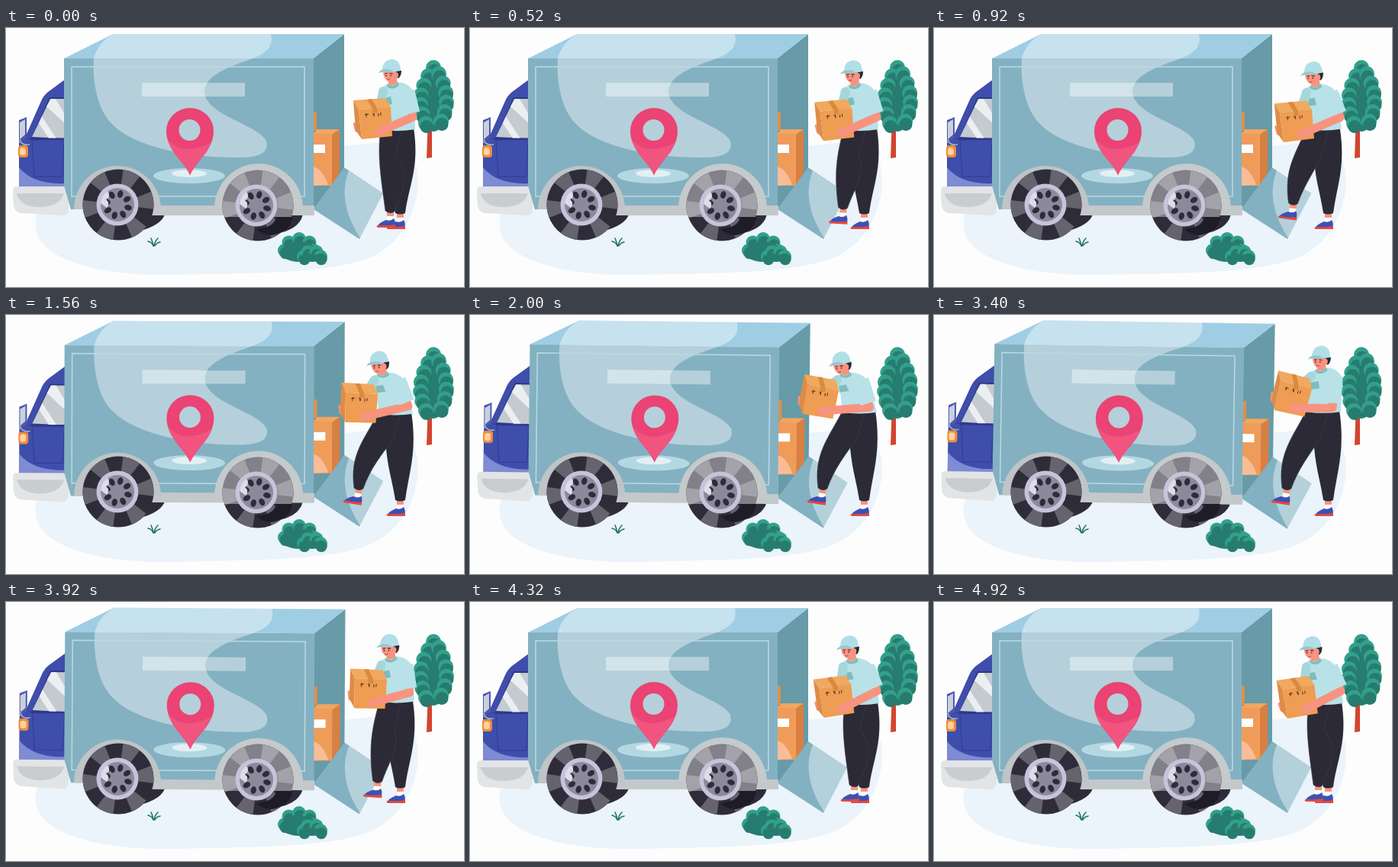
Recreate the animation shown at these times as an HTML page. Size 600 by 340 pixels, loop 4960 ms.

```html
<!DOCTYPE html>
<html lang="en">
<head>
<meta charset="utf-8">
<title>Loading a delivery truck</title>
<style>
html, body { margin: 0; width: 100%; height: 100%; overflow: hidden; background: #fdfdfd; }
svg { display: block; width: 100vw; height: 100vh; }
.skin { fill: #f7937f; }
.arm { fill: none; stroke: #f7937f; stroke-width: 11; stroke-linejoin: round; stroke-linecap: round; }
.pants { fill: #2c2a37; }
.gloss { fill: #fff; fill-opacity: .4; }
.leaf { fill: #32a08b; }
.shade { fill: #277c6f; }
</style>
</head>
<body>
<svg viewBox="0 0 600 340">
  <defs>
    <g id="tyre">
      <circle r="46.5" fill="#2f2c3a"/>
      <circle r="36.5" fill="none" stroke="#65636e" stroke-width="20" stroke-dasharray="18.5 19.72" transform="rotate(-82)"/>
    </g>
    <g id="rim">
      <circle r="27.5" fill="#c5c4da"/>
      <circle r="22" fill="#8b899b"/>
      <g id="holes" fill="#2f2c3a"></g>
      <path d="M-22-2A22 22 0 0 1-13-18Q-8-10-15-7Q-9-2-14 4Z" fill="#dddde9"/>
    </g>
    <g id="shoe">
      <path class="skin" d="M-4-2H5V12H-4Z"/>
      <path fill="#fff" d="M-4 6H5V12H-4Z"/>
      <path fill="#3d50b4" d="M-5 11Q1 13 5 9Q8 14 6 19H-16Q-15 15-5 11Z"/>
      <path fill="#e4483f" d="M-17 18Q-8 19 7 17V21H-16Q-18 20-17 18Z"/>
    </g>
  </defs>

  <path fill="#eaf4fa" d="M39 262C42 300 110 324 205 324C330 322 430 322 480 300C530 275 540 225 540 200C540 165 520 148 480 151L200 180C80 190 36 220 39 262Z"/>
  <path fill="#d1452f" d="M551 171L553 115H558L558 170Z"/>
  <g id="tree"></g>
  <path fill="#2f2c3a" d="M165 245H208Q203 258 180 265ZM350 245H389Q384 264 358 269Z"/>

  <g id="truck">
    <path fill="#679ba7" d="M402 40L443 8V184L403 238Z"/>
    <path fill="#e08f4a" d="M402 110H407V135H402Z"/>
    <path fill="#f2a65e" d="M402 139L408 133H437L427 140Z"/>
    <path fill="#ef9c5a" d="M402 139H427V207H402Z"/>
    <path fill="#d97f42" d="M427 140L437 133V190L427 207Z"/>
    <path fill="#f8bd97" d="M402 182Q414 184 422 206L402 207Z"/>
    <path fill="#fff" d="M402 153H418V164H402Z"/>
    <path fill="#82b1c2" d="M403 238L443 183L494 217L463 277Z"/>
    <path class="gloss" fill-opacity=".33" d="M449 187Q433 228 464 276L494 217Z"/>

    <path fill="#3f4dab" d="M78 67L55 84Q49 89 46 96L27 139L17 151V209H78Z"/>
    <path fill="#7f8bd2" d="M17 183Q36 206 78 204V209H17Z"/>
    <path fill="#2d3788" d="M57 91H78V147H32Z"/>
    <path fill="#c4cbd0" d="M58 93H78V145L34 143Z"/>
    <path fill="#eceff1" d="M53 103L59 93H65L78 115V126ZM47 116L66 145H56L43 125Z"/>
    <path fill="none" stroke="#303b91" d="M28 145H77M34 146L37 195H74L76 148"/>
    <path fill="#4b59af" d="M17 121L27 117V144L17 150Z"/>
    <path fill="#c9d0dc" d="M18 124L25 120V140L18 146Z"/>
    <path fill="none" stroke="#aeb6c4" stroke-width="1.5" d="M18 146Q20 155 31 153"/>
    <rect x="16" y="154" width="13" height="16" rx="4" fill="#ee8b3d"/>
    <rect x="18" y="157" width="8" height="10" rx="3" fill="#ffd39a"/>
    <path fill="#e2e4e5" d="M14 208H76Q82 208 82 215V236Q82 246 73 246L20 243Q11 242 10 233L9 214Q9 208 14 208Z"/>
    <path fill="#c8cdcf" d="M14 217H76Q70 236 40 235Q18 233 14 217Z"/>

    <path fill="#9fcee4" d="M76 40L140 8H443L403 40Z"/>
    <path fill="#83b1c2" d="M76 40H403V238H85L76 207Z"/>
    <path class="gloss" d="M140 8H347C351 26 340 35 312 44C281 55 260 66 260 84C262 115 329 126 341 148C345 163 333 171 300 170C230 170 165 153 140 127C119 108 113 68 115 40Q120 20 140 8Z"/>
    <path fill="none" stroke="#b9dae3" stroke-width="1.5" d="M86 222V51H391V221H86"/>
    <path class="gloss" fill-opacity=".42" d="M178 72H313V90H178Z"/>
    <ellipse cx="240" cy="194" rx="47" ry="10" fill="#b4d8e2"/>
    <ellipse cx="240" cy="191" rx="23" ry="5" fill="#e2f0f4"/>
    <path fill="#ea4374" fill-rule="evenodd" d="M241 193C232 173 210 160 210 135A31 30 0 0 1 272 135C272 160 250 173 241 193ZM254.500 134A14 14 0 1 0 226.500 134A14 14 0 1 0 254.500 134Z"/>
    <path fill="#f0547f" d="M212 146Q232 170 269 150C263 168 249 175 241 193C234 176 216 166 212 146Z"/>
    <path fill="#c3c8ca" d="M185 233H285V246H185ZM370 233H404V246H370Z"/>
    <path fill="#bfc4c7" d="M89 238A57 57 0 0 1 203 238Z"/>
    <path fill="#c5cacc" d="M273 237A58 59 0 0 1 389 237Z"/>
  </g>
  <use href="#tyre" x="147" y="232"/>
  <use href="#rim" x="146" y="232"/>
  <use href="#tyre" x="330" y="233"/>
  <path class="gloss" fill-opacity=".68" d="M286 248A46.500 46.500 0 1 1 374 248Z"/>
  <path fill="#1f1c2a" d="M327 264Q352 262 354 248H375Q373 268 348 272Q335 271 327 264Z"/>
  <use href="#rim" x="328" y="233"/>

  <path fill="none" stroke="#237466" stroke-width="1.6" stroke-linecap="round" d="M193 286Q191 281 186 280M193 286Q192 280 190 276M194 286Q195 280 199 276M195 286Q197 282 202 281"/>
  <g id="bush"></g>

  <g id="man">
    <use href="#shoe" x="516" y="243"/>
    <path class="pants" id="backLeg"/>
    <use href="#shoe" id="frontShoe"/>
    <path class="pants" id="frontLeg" stroke="#42404d" stroke-width=".6"/>
    <g id="torso">
      <path class="skin" d="M501 64H512L513 77Q506 81 501 75Z"/>
      <path fill="#b8e2e7" d="M500 73Q506 79 513 71Q529 72 535 86L536 133Q512 137 491 133L494 104L487 92Q486 81 500 73Z"/>
      <path fill="#81bcba" d="M494 92L504 90L506 100L494 102ZM500 73Q506 80 513 71L515 75Q506 83 499 77Z"/>
    </g>
    <path id="farSleeve" fill="none" stroke="#a5d6dc" stroke-width="12" stroke-linecap="round"/>
    <g id="box">
      <path class="skin" d="M4 30Q-1 27 0 32L2 40Q5 44 9 40Z"/>
      <path fill="#f0a95f" d="M0 0L42-3L49 9L7 12Z"/>
      <path fill="#dd8c47" d="M0 0L7 12L11 51L3 39Z"/>
      <path fill="#ee9d52" d="M7 12L49 9L51 47L11 51Z"/>
      <path fill="#d98a3d" d="M18-1L24-2L31 10L32 16L26 17L25 11Z"/>
      <path fill="none" stroke="#4d3427" d="M15 19L20 18M17 17V22M25 17L28 20M27 17V21M33 17V21M36 16V20"/>
    </g>
    <path class="arm" id="arm"/>
    <path id="sleeve" fill="none" stroke="#b8e2e7" stroke-width="21"/>
    <g id="head">
      <path fill="#2b2937" d="M4 6H12Q12 13 8 16L4 14Z"/>
      <path class="skin" d="M-12 6Q-12 14-8 18Q-4 23 2 18Q8 16 8 12Q8 8 5 8V5Z"/>
      <path fill="none" stroke="#2b2937" stroke-width="1.200" stroke-linecap="round" d="M-9 10L-7 9.500M-3 9.500L0 10M-8 12V13M-2 12V13"/>
      <path fill="none" stroke="#b84b48" d="M-7 17Q-5 18-3 17"/>
      <path fill="#b0dfe8" d="M-13 6Q-13-8 0-9Q11-8 11 6Q-2 9-13 6Z"/>
      <path fill="#8fcbd5" d="M-18 9Q-15 3-5 4Q0 5 2 8Q-8 6-18 9Z"/>
    </g>
  </g>
</svg>
<script>
const LOOP = 4960;
const $ = id => document.getElementById(id);
const set = (id, name, value) => $(id).setAttribute(name, value);

// smooth rise from 0 to 1 between two times
function ramp(t, from, to) {
  const u = Math.min(1, Math.max(0, (t - from) / (to - from)));
  return u * u * (3 - 2 * u);
}

function turned(x, y, deg) {
  const a = deg * Math.PI / 180, c = Math.cos(a), s = Math.sin(a);
  return [x * c - y * s, x * s + y * c];
}

function draw(t) {
  const back = ramp(t, 3400, 4320);
  const step = ramp(t, 0, 1300) - back;
  const lift = ramp(t, 600, 2400) - back;
  const lean = ramp(t, 1200, 2400) - back;
  const bow = 19 * ramp(t, 0, 2000) - 21 * ramp(t, 2500, 3400) + 12 * ramp(t, 3400, 4600);
  const low = bow * (1 - lift);

  const hx = 512 - 3 * step, hy = 133 - 6 * lift;
  const x = 506 - bow, y = 50 + .37 * bow;
  const fx = 503 - 41 * step, fy = 241 - 13 * step;
  const bx = 455 - 5 * step - .63 * bow, by = 95 - 22 * lift + .8 * low;
  const tilt = 18 * lift - .4 * low;
  const ex = 533 - 11 * lift, ey = 117 + 5 * lift;

  set('truck', 'transform', `rotate(${.86 * lean} 209 257)`);
  set('head', 'transform', `translate(${x} ${y}) rotate(${-.35 * bow})`);
  set('box', 'transform', `translate(${bx} ${by}) rotate(${tilt})`);
  set('frontShoe', 'transform', `translate(${fx} ${fy}) rotate(${9 * step})`);

  // the torso shears so that the neck follows the head
  const dx = hx - 512, dy = hy - 133;
  const kx = (x - 506 - dx) / 81, ky = (y - 50 - dy) / 81;
  const onTorso = (px, py) => [px + dx + kx * (133 - py), py + dy + ky * (133 - py)];
  set('torso', 'transform', `matrix(1 0 ${-kx} ${1 - ky} ${dx + 133 * kx} ${dy + 133 * ky})`);

  set('backLeg', 'd', `M${hx - 15} ${hy - 2}H${hx + 22}C${hx + 30} ${hy + 50} 528 205 523 243
    Q516 246 510 243C506 215 499 200 ${hx - 12} ${hy + 32}Z`);
  const left = hx - 21, ax = fx - 6, ay = fy - 1;
  set('frontLeg', 'd', `M${left} ${hy - 2}C${left + (ax - left) * .35 - 7} ${hy + 34} ${ax - 6} ${ay - 45} ${ax} ${ay}
    Q${fx} ${fy + 4} ${fx + 6} ${fy}C${fx + 15} ${fy - 26} ${fx + 30} ${fy - 45} ${hx - 2} ${hy + 34}L${hx + 8} ${hy - 2}Z`);

  const shoulder = onTorso(525, 83), far = onTorso(494, 83);
  const [gx, gy] = turned(34, 41, tilt), [cx, cy] = turned(36, 6, tilt);
  const mid = shoulder.map((v, i) => v + ([ex, ey][i] - v) * .85);
  set('arm', 'd', `M${mid}L${ex} ${ey}L${bx + gx} ${by + gy}`);
  set('sleeve', 'd', `M${shoulder}L${mid}`);
  set('farSleeve', 'd', `M${far}L${bx + cx} ${by + cy}`);
}

const repeat = (n, make) => Array.from({ length: n }, (_, i) => make(i)).join('');

// a tuft of leaves, lit from above
const tuft = (x, y, r) => `<circle class="leaf" cx="${x}" cy="${y}" r="${r}"/>` +
  `<circle class="shade" cx="${x + 1}" cy="${y + r * .4}" r="${r * .85}"/>`;

// a dome of tufts over a dark base
function shrub(x, y, rx, ry, n) {
  return repeat(n, i => {
    const a = Math.PI * i / (n - 1);
    return tuft(x - rx * Math.cos(a), y - ry * Math.sin(a), 9);
  }) + `<ellipse class="shade" cx="${x}" cy="${y + 2}" rx="${rx + 5}" ry="${ry - 2}"/>`;
}

$('holes').innerHTML = repeat(8, i =>
  `<ellipse cy="-14.500" rx="3.600" ry="5" transform="rotate(${i * 45 + 15})"/>`);
$('tree').innerHTML = '<ellipse class="shade" cx="560" cy="94" rx="20" ry="42"/>' + tuft(560, 52, 10) +
  repeat(6, i => {
    const y = 60 + i * 12.5, half = 17 * Math.sin(Math.PI * (i + 1) / 7.5);
    return tuft(560 - half, y + 3, 10) + tuft(560 + half, y, 10);
  });
$('bush').innerHTML = shrub(384, 292, 19, 15, 5) + shrub(401, 300, 11, 7, 4);

function tick(now) {
  draw(now % LOOP);
  requestAnimationFrame(tick);
}
draw(0);
requestAnimationFrame(tick);
</script>
</body>
</html>
```
